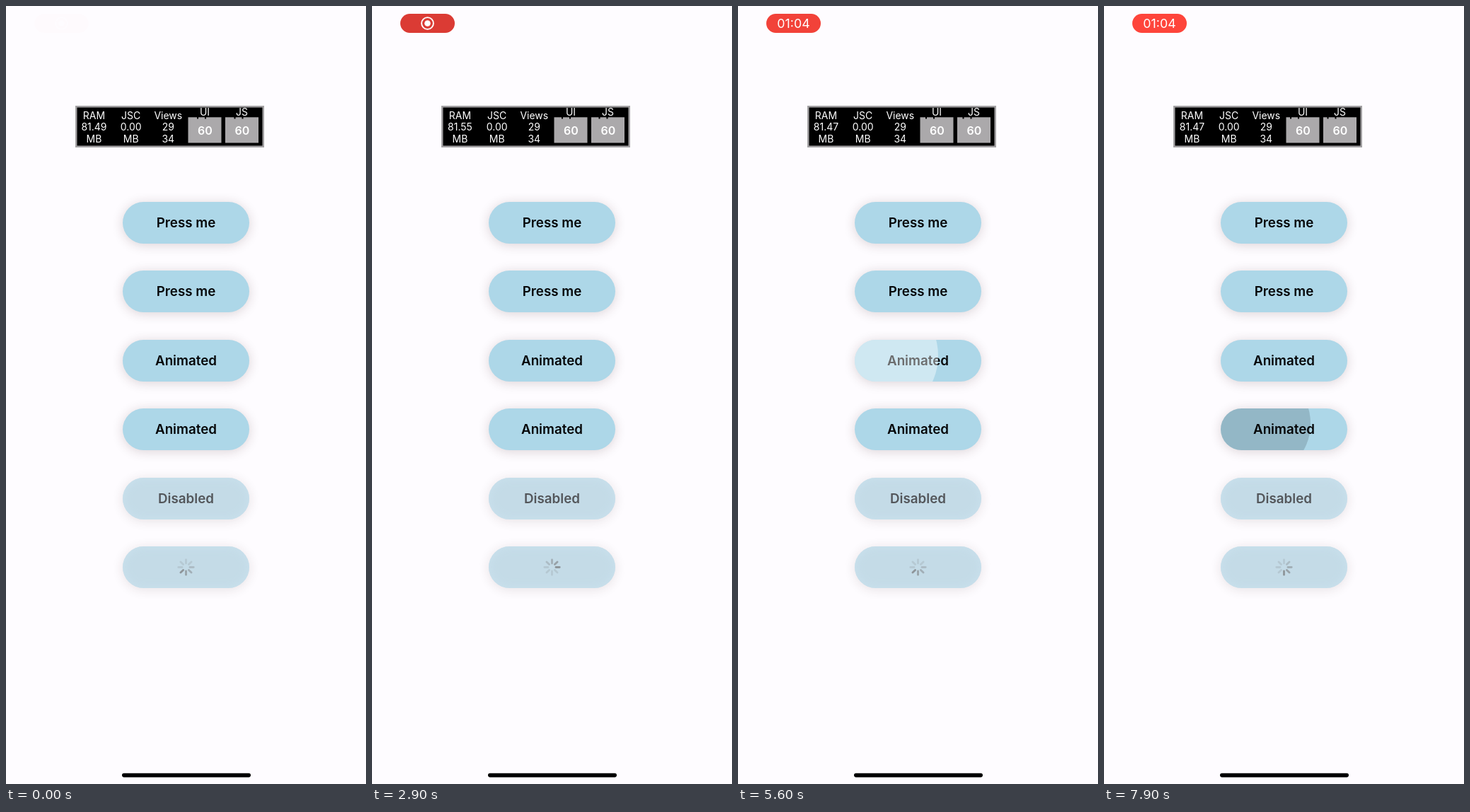
An HTML page for the animation above (8 s loop, 509x1100 px).

```html
<!DOCTYPE html>
<html lang="en">
<head>
<meta charset="utf-8">
<title>Button feedback</title>
<style>
  html, body { margin: 0; width: 100%; height: 100%; overflow: hidden; background: #fefcff; }
  body { position: relative; font-family: Inter, Roboto, sans-serif; }
  svg { position: absolute; left: 0; top: 0; }
  .button {
    position: absolute; left: 165px; width: 179px; height: 59px; line-height: 59px;
    border-radius: 29.5px; background: #add7e8; overflow: hidden;
    box-shadow: 0 2px 16px rgba(60, 30, 35, .18);
    text-align: center; font-size: 18.8px; font-weight: 600; color: #050608;
  }
  .button.off {
    background: #c4dbe7; color: #53565a;
    box-shadow: 0 2px 16px rgba(60, 30, 35, .12), inset 0 0 14px #cae2ee;
  }
  .ripple { position: absolute; border-radius: 50%; }
</style>
</head>
<body>
<svg id="scene" width="509" height="1100" text-anchor="middle" font-size="14" fill="#fff">
  <g id="pill">
    <rect id="pillShape" x="40" y="11" width="77" height="27" rx="13.5"/>
    <g id="record">
      <circle cx="78.5" cy="24.5" r="8.4" fill="none" stroke="#fff" stroke-width="1.9"/>
      <circle cx="78.5" cy="24.5" r="4.3"/>
    </g>
    <text id="clock" x="78.5" y="31" font-size="17.8">01:04</text>
  </g>
  <rect x="99.25" y="142.25" width="264.5" height="56.5" fill="#000" stroke="#a3a1a3" stroke-width="2.5"/>
  <text x="124.5" y="159.5">RAM</text>
  <text x="124.5" y="176.3" id="ram"></text>
  <text x="124.5" y="193">MB</text>
  <text x="176.7" y="159.5">JSC</text>
  <text x="176.7" y="176.3">0.00</text>
  <text x="176.7" y="193">MB</text>
  <text x="229.3" y="159.5">Views</text>
  <text x="229.3" y="176.3">29</text>
  <text x="229.3" y="193">34</text>
  <g id="meters"></g>
  <rect x="164" y="1084.8" width="182" height="5.6" rx="2.8" fill="#000"/>
</svg>
<script>
const LOOP = 8000;
const $ = id => document.getElementById(id);
const clamp = v => Math.max(0, Math.min(1, v));

function svg(parent, tag, attrs, text = "") {
  const el = document.createElementNS("http://www.w3.org/2000/svg", tag);
  for (const key in attrs) el.setAttribute(key, attrs[key]);
  el.textContent = text;
  return parent.appendChild(el);
}

// Frame-rate meters with small notches drifting left
const notches = [["UI", 257.5], ["JS", 310]].flatMap(([name, x]) => {
  svg($("meters"), "rect", { x, y: 157.3, width: 47, height: 36.2, fill: "#aba9ab" });
  svg($("meters"), "text", { x: x + 23.5, y: 155.4 }, name);
  svg($("meters"), "text", { x: x + 24, y: 181.5, "font-size": 16, "font-weight": 600 }, "60");
  return [12.5, 23.5].map(dx => ({
    x: x + dx,
    el: svg($("meters"), "rect", { y: 157, width: 2, height: 2.5, fill: "#000" })
  }));
});

const buttons = ["Press me", "Press me", "Animated", "Animated", "Disabled", ""].map((label, i) => {
  const el = document.createElement("div");
  el.className = i < 4 ? "button" : "button off";
  el.style.top = 277 + i * 97.4 + "px";
  el.textContent = label;
  return document.body.appendChild(el);
});

// Touch points are relative to the button; r is the final ripple radius
const DARK = "rgba(0,0,0,.15)", LIGHT = "rgba(255,255,255,.41)";
const ripples = [
  { button: 1, start: 3000, x: 64, y: 30, r: 150, color: DARK },
  { button: 1, start: 3977, x: 64.5, y: 31, r: 150, color: DARK },
  { button: 2, start: 4750, x: 40, y: 26, r: 170, color: LIGHT },
  { button: 2, start: 5400, x: 33, y: 23, r: 170, color: LIGHT },
  { button: 3, start: 6300, x: 50, y: 24, r: 150, color: DARK },
  { button: 3, start: 7700, x: 52, y: 21, r: 150, color: DARK }
];
for (const ripple of ripples) {
  const el = ripple.el = document.createElement("div");
  el.className = "ripple";
  el.style.background = ripple.color;
  buttons[ripple.button].append(el);
}

const spinner = svg(buttons[5], "svg", { width: 179, height: 59 });
const spokes = Array.from({ length: 8 }, (_, i) => svg(spinner, "line", {
  x1: 89.5, x2: 89.5, y1: 18.8, y2: 24, stroke: "#85898c", "stroke-width": 2.8,
  "stroke-linecap": "round", transform: `rotate(${i * 45} 89.5 29.5)`
}));

function pressOpacity(age) {
  if (age < 0) return 1;
  return 1 - .39 * Math.min(clamp(age / 150), clamp((450 - age) / 250));
}

function draw(t) {
  const glow = (1 + Math.cos(t / 1000 * Math.PI)) / 2;
  $("pillShape").setAttribute("fill",
    `rgb(${218 + 37 * glow},${59 + 10 * glow},${52 + 7 * glow})`);
  $("pill").setAttribute("opacity", clamp(t / 400));
  $("record").setAttribute("opacity", t < 3500 ? 1 : 0);
  $("clock").setAttribute("opacity", t < 3500 ? 0 : 1);

  $("ram").textContent = t < 1000 ? "81.49" : t < 3500 ? "81.55" : t < 5000 ? "81.58" : "81.47";
  for (const { el, x } of notches) el.setAttribute("x", x - Math.floor(t / 1000));

  buttons[0].style.opacity = Math.min(pressOpacity(t - 1200), pressOpacity(t - 1950));

  for (const { el, start, x, y, r } of ripples) {
    const age = t - start;
    const radius = r * clamp(age / 400);
    Object.assign(el.style, {
      left: x - radius + "px", top: y - radius + "px",
      width: 2 * radius + "px", height: 2 * radius + "px",
      opacity: age < 0 ? 0 : clamp((700 - age) / 200)
    });
  }

  const lead = 5 + Math.floor(t / 100);
  spokes.forEach((spoke, i) => {
    const behind = (lead - i + 80) % 8;
    spoke.setAttribute("opacity", Math.max(.22, .85 - behind * .16));
  });
}

function tick() {
  draw(performance.now() % LOOP);
  requestAnimationFrame(tick);
}
tick();
</script>
</body>
</html>
```
